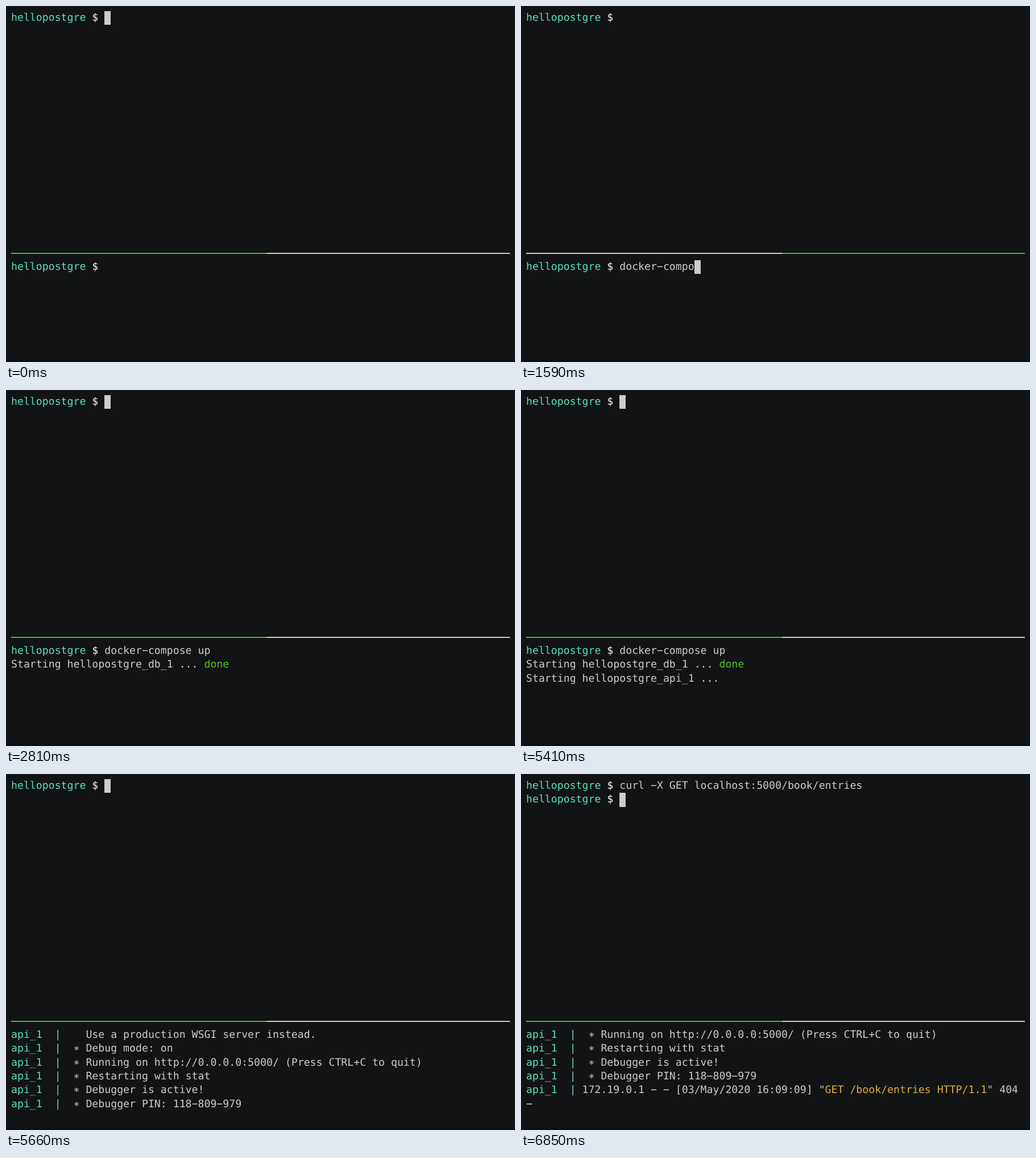
Write an HTML page that moves like this. It is 895 by 626 pixels and loops after 8000 ms.

```html
<!DOCTYPE html>
<html lang="en">
<head>
<meta charset="utf-8">
<title>Terminal session</title>
<style>
  html, body { margin: 0; width: 100%; height: 100%; overflow: hidden; background: #121314; }
  #screen {
    position: absolute; left: 0; top: 0; width: 895px; height: 626px; overflow: hidden;
    color: #ccc; background: #121314;
    font: 18.21px/24.33px "DejaVu Sans Mono", monospace;
    text-rendering: geometricPrecision;
    font-variant-ligatures: none;
  }
  #screen > * { position: absolute; margin: 0; }
  pre { left: 9px; font: inherit; white-space: pre; }
  #upper { top: 9px; }
  #lower { top: 446.94px; }
  .rule { top: 434px; height: 2px; background: #ccc; }
  .rule.on { background: #4ebf22; }
  #ruleLeft { left: 9px; width: 449.5px; }
  #ruleRight { left: 458.5px; width: 427.5px; }
  #cursor { width: 10.96px; height: 24.33px; background: #ccc; }
  #edge { left: 0; top: 622px; width: 895px; height: 4px; background: #0e0f10; }
  .cyan { color: #54e1b9; }
  .green { color: #4ebf22; }
  .yellow { color: #ddaf3c; }
  .white { color: #fff; }
</style>
</head>
<body>
<div id="screen">
  <pre id="upper"></pre>
  <div id="ruleLeft" class="rule"></div>
  <div id="ruleRight" class="rule"></div>
  <pre id="lower"></pre>
  <div id="cursor"></div>
  <div id="edge"></div>
</div>
<script>
  const LOOP = 8000, CELL_W = 10.963, CELL_H = 24.33, MARGIN = 9, LOWER_ROW = 18;
  const el = id => document.getElementById(id);

  // Wide dash and centred star, as a terminal font shows them.
  const glyphs = text => text.replace(/-/g, "\u2212").replace(/\*/g, "\u2217");
  const paint = (color, text) => `<span class="${color}">${glyphs(text)}</span>`;
  const prompt = (command = "") =>
    paint("cyan", "hellopostgre ") + paint("white", "$ ") + glyphs(command);
  const api = text => paint("cyan", "api_1  |") + glyphs(text);
  const starting = name => `Starting hellopostgre_${name}_1 ... `;

  const PROMPT_COLS = 15;
  const command = "docker-compose up";
  const request = "curl -X GET localhost:5000/book/entries";
  const keyTimes = [660, 755, 850, 910, 970, 1030,
    1220, 1294, 1368, 1442, 1516, 1590, 1650, 1745, 1840, 2030, 2230];

  const done = paint("green", "done");
  const launch = [prompt(command), starting("db") + done];
  const server = [
    "    Use a production WSGI server instead.",
    "  * Debug mode: on",
    "  * Running on http://0.0.0.0:5000/ (Press CTRL+C to quit)",
    "  * Restarting with stat",
    "  * Debugger is active!",
    "  * Debugger PIN: 118-809-979"
  ].map(api);
  const access = api(" 172.19.0.1 - - [03/May/2020 16:09:09] \"") +
    paint("yellow", "GET /book/entries HTTP/1.1") + "\" 404";

  function upperPane(t) {
    if (t < 6390) return [prompt()];
    if (t < 6850) return [prompt(request)];
    return [prompt(request), prompt()];
  }

  function lowerPane(t, typed) {
    if (t < 2620) return [prompt(command.slice(0, typed))];
    if (t < 2810) return [prompt(command), starting("db")];
    if (t < 5410) return launch;
    if (t < 5540) return [...launch, starting("api")];
    if (t < 5600) return [...launch, starting("api") + done];
    if (t < 5660) return [...launch, starting("api") + done,
      "Attaching to hellopostgre_db_1, hellopostgre_api_1"];
    if (t < 6850) return server;
    return [...server.slice(2), access, glyphs("-")];
  }

  function cursorAt(t, typed) {
    if (t < 400) return [PROMPT_COLS, 0];
    if (t < 2360) return [PROMPT_COLS + typed, LOWER_ROW];
    if (t < 2620) return [0, LOWER_ROW + 1];
    if (t < 2810) return [0, LOWER_ROW + 2];
    if (t < 6390) return [PROMPT_COLS, 0];
    if (t < 6790) return [PROMPT_COLS + request.length, 0];
    if (t < 6850) return [0, 1];
    return [PROMPT_COLS, 1];
  }

  function show(id, lines) {
    const html = lines.join("\n"), pane = el(id);
    if (pane.shown !== html) pane.innerHTML = pane.shown = html;
  }

  function frame() {
    const t = performance.now() % LOOP;
    const typed = keyTimes.filter(time => time <= t).length;
    const lowerActive = t >= 400 && t < 2810;
    const [col, row] = cursorAt(t, typed);
    show("upper", upperPane(t));
    show("lower", lowerPane(t, typed));
    el("ruleLeft").classList.toggle("on", !lowerActive);
    el("ruleRight").classList.toggle("on", lowerActive);
    el("cursor").style.left = MARGIN + col * CELL_W + "px";
    el("cursor").style.top = MARGIN + row * CELL_H + "px";
    requestAnimationFrame(frame);
  }
  frame();
</script>
</body>
</html>
```
